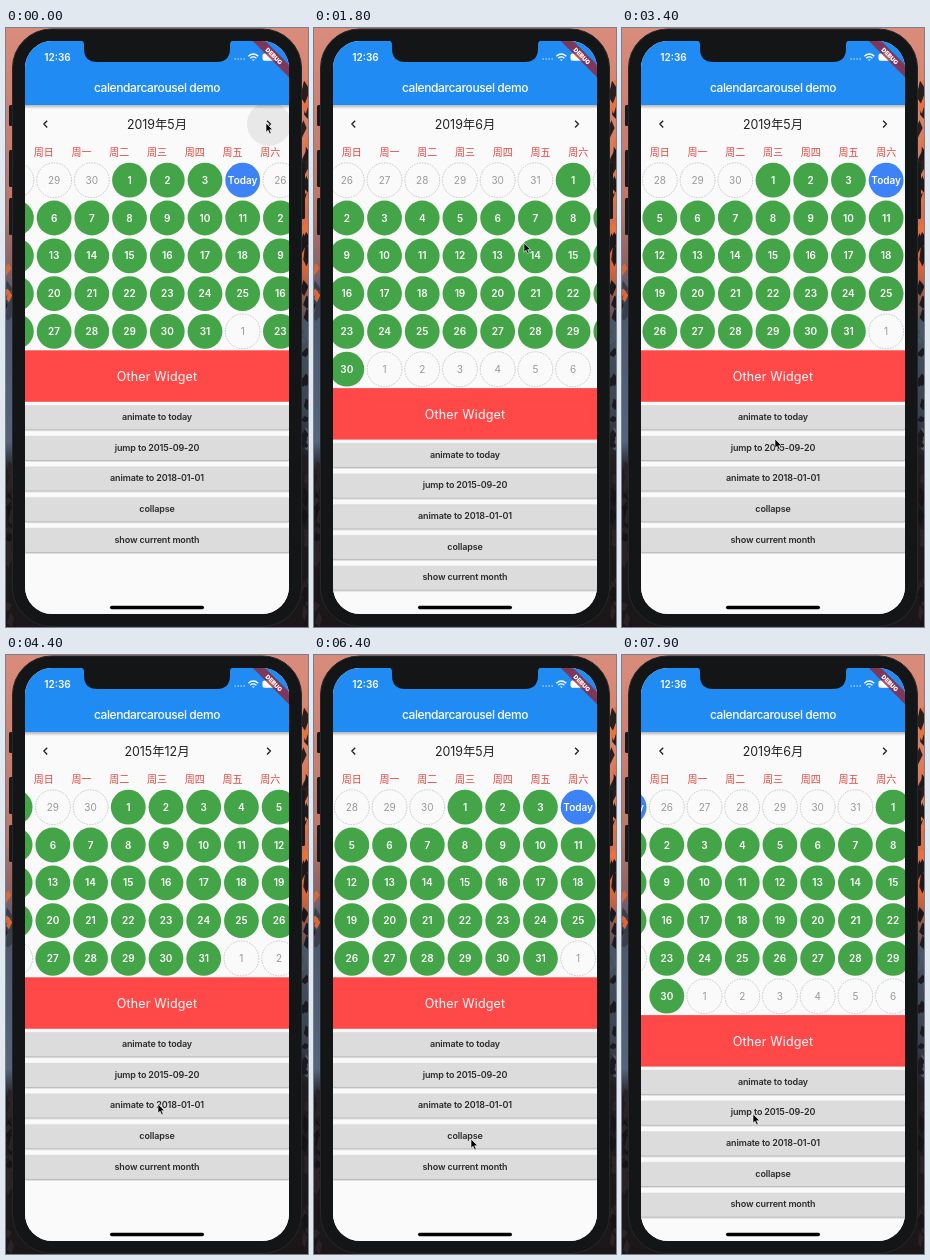
Animation of 302 by 599 pixels, one loop 8 s. Source, as an HTML page:

```html
<!DOCTYPE html>
<html lang="zh">
<head>
<meta charset="utf-8">
<title>Calendar carousel</title>
<style>
  html, body { margin: 0; width: 100%; height: 100%; overflow: hidden; background: #1c1a20; }
  svg { display: block; width: 302px; height: 599px; }
  text { font-family: Inter, "Noto Sans CJK SC", "Noto Sans CJK", "Noto Sans", sans-serif; text-anchor: middle; }
</style>
</head>
<body>
<svg id="stage" viewBox="0 0 302 599" xmlns="http://www.w3.org/2000/svg">
  <defs>
    <linearGradient id="skyL" x1="0" y1="0" x2="0" y2="1">
      <stop offset="0" stop-color="#d98c7c"/>
      <stop offset=".3" stop-color="#b9766a"/>
      <stop offset=".4" stop-color="#8a6266"/>
      <stop offset=".45" stop-color="#4a566c"/>
      <stop offset=".69" stop-color="#56657c"/>
      <stop offset=".74" stop-color="#201c20"/>
      <stop offset="1" stop-color="#1b1718"/>
    </linearGradient>
    <linearGradient id="skyR" x1="0" y1="0" x2="0" y2="1">
      <stop offset="0" stop-color="#d98c7c"/>
      <stop offset=".12" stop-color="#d9846c"/>
      <stop offset=".4" stop-color="#d9653c"/>
      <stop offset=".5" stop-color="#46505f"/>
      <stop offset=".64" stop-color="#3c4453"/>
      <stop offset=".72" stop-color="#201c20"/>
      <stop offset="1" stop-color="#1b1718"/>
    </linearGradient>
    <linearGradient id="barShade" x1="0" y1="0" x2="0" y2="1">
      <stop offset="0" stop-color="#000" stop-opacity=".28"/>
      <stop offset="1" stop-color="#000" stop-opacity="0"/>
    </linearGradient>
    <clipPath id="screen"><rect x="19" y="13" width="264" height="573" rx="27"/></clipPath>
  </defs>

  <rect width="151" height="599" fill="url(#skyL)"/>
  <rect x="151" width="151" height="599" fill="url(#skyR)"/>
  <g id="rocks"></g>

  <g fill="#18191b">
    <rect x="3" y="77" width="5" height="21" rx="1.5"/>
    <rect x="3" y="122" width="5" height="37" rx="1.5"/>
    <rect x="3" y="170" width="5" height="37" rx="1.5"/>
    <rect x="294" y="135" width="5" height="56" rx="1.5"/>
  </g>
  <rect x="6.5" y="1" width="289" height="597.5" rx="39" fill="#131516" stroke="#25282a"/>

  <g clip-path="url(#screen)">
    <rect x="19" y="13" width="264" height="573" fill="#fafafa"/>
    <g id="pages"></g>
    <g id="week"></g>
    <circle id="ripple" cx="263" cy="96" r="22"/>
    <text id="month" x="151" y="100.8" font-size="12.4" fill="#222"></text>
    <path d="M41.2 92.8l-3.3 3.3 3.3 3.3M261.1 92.8l3.3 3.3-3.3 3.3" fill="none" stroke="#222" stroke-width="1.35"/>
    <g id="lower">
      <rect x="19" y="322" width="264" height="310" fill="#fafafa"/>
      <rect x="19" y="322" width="264" height="51.5" fill="#ff4848"/>
      <text x="151" y="352.5" font-size="12.5" letter-spacing=".15" fill="#fff">Other Widget</text>
    </g>
    <rect x="19" y="77" width="264" height="4" fill="url(#barShade)"/>
    <rect x="19" y="13" width="264" height="64" fill="#1f8bf3"/>
    <text x="151" y="63.8" font-size="12" font-weight="500" letter-spacing="-.4" fill="#fff">calendarcarousel demo</text>
    <text x="51.5" y="32.8" font-size="10" font-weight="600" fill="#fff">12:36</text>
    <path d="M228.5 31h11" stroke="#fff" stroke-opacity=".6" stroke-width="1.3" stroke-dasharray="1.4 1.6"/>
    <path d="M242.3 28.2q5-4.4 10 0M244.2 30.2q3.1-2.6 6.2 0" fill="none" stroke="#fff" stroke-width="1.4"/>
    <path d="M245.8 31.4h3l-1.5 1.7z" fill="#fff"/>
    <rect x="256.5" y="25.5" width="13.5" height="7.2" rx="2" fill="#fff"/>
    <rect x="270.7" y="27.6" width="1" height="3" rx=".5" fill="#fff"/>
    <g transform="translate(268 28) rotate(45)">
      <rect x="-40" y="-4.4" width="80" height="8.8" fill="#9c1c28" fill-opacity=".74"/>
      <text y="2.2" font-size="6" font-weight="900" fill="#fff">DEBUG</text>
    </g>
    <rect x="104" y="577.8" width="94" height="3.4" rx="1.7" fill="#000"/>
  </g>
  <path d="M74 12.5q4 0 4 4v4q0 13.5 13.5 13.5h119q13.5 0 13.5-13.5v-4q0-4 4-4z" fill="#131516"/>
  <path id="cursor" d="M0 0v9.2l2.1-1.9 1.5 3.4 1.6-.7-1.5-3.3h2.9z" fill="#000" stroke="#fff" stroke-width=".6"/>
</svg>

<script>
const NS = 'http://www.w3.org/2000/svg';
const LOOP = 8000, PAGE = 264, COL = PAGE / 7, ROW = 37.8;
const LEFT = 19 + COL / 2, TOP = 152.2;
const $ = id => document.getElementById(id);

function add(parent, tag, attrs, text) {
  const el = document.createElementNS(NS, tag);
  for (const k in attrs) el.setAttribute(k, attrs[k]);
  if (text) el.textContent = text;
  parent.appendChild(el);
  return el;
}

// Jagged landscape at both sides of the phone
let seed = 11;
const rnd = () => (seed = seed * 16807 % 2147483647) / 2147483647;
function rocks(x, y0, y1, count, colors) {
  for (let i = 0; i < count; i++) {
    const y = y0 + rnd() * (y1 - y0), h = 5 + rnd() * 18;
    add($('rocks'), 'path', {
      d: `M${x + rnd() * 4} ${y}l${3 + rnd() * 4} ${h * .4}l${-2 - rnd() * 4} ${h * .6}l${-2 - rnd() * 3} ${-h * .3}z`,
      fill: colors[Math.floor(rnd() * colors.length)]
    });
  }
}
rocks(1, 235, 285, 12, ['#1e1a1f', '#d8683c', '#3a3f4d']);
rocks(1, 430, 590, 16, ['#151315', '#2a2224']);
rocks(297, 50, 260, 26, ['#1d1719', '#e8713f', '#2b1d1c']);
rocks(297, 260, 420, 16, ['#1b191f', '#4b5566']);
rocks(297, 430, 590, 14, ['#151315', '#2a2224']);

[...'日一二三四五六'].forEach((d, i) =>
  add($('week'), 'text', { x: LEFT + i * COL, y: 128.4, 'font-size': 10, fill: '#e5443c' }, '周' + d));

['animate to today', 'jump to 2015-09-20', 'animate to 2018-01-01', 'collapse', 'show current month']
  .forEach((label, i) => {
    const y = 377 + i * 30.7;
    const box = (dy, fill, o) => add($('lower'), 'rect',
      { x: 19, y: y + dy, width: PAGE, height: 23.9, rx: 1.2, fill, 'fill-opacity': o });
    box(2, '#000', .1);
    box(1, '#000', .16);
    box(-.6, '#000', .05);
    box(0, '#dcdcdc', 1);
    add($('lower'), 'text', {
      x: 151, y: y + 14.6, 'font-size': 9, 'font-weight': 600, 'letter-spacing': -.14, fill: '#2a2a2a'
    }, label);
  });

// Months are counted from May 2019
const monthDate = n => new Date(2019, 4 + n, 1);
function rowCount(n) {
  const days = new Date(2019, 5 + n, 0).getDate();
  return Math.ceil((monthDate(n).getDay() + days) / 7);
}

function makePage() {
  const g = add($('pages'), 'g', {});
  const cells = [];
  for (let i = 0; i < 42; i++) {
    const x = LEFT + i % 7 * COL, y = TOP + Math.floor(i / 7) * ROW;
    const cell = add(g, 'g', {});
    cells.push({
      cell,
      dot: add(cell, 'circle', { cx: x, cy: y, r: 17.4, 'stroke-width': .7, 'stroke-dasharray': '1.6 1.1' }),
      label: add(cell, 'text', { x, y: y + 3.6, 'font-size': 10 })
    });
  }
  return { g, cells, month: null };
}

function fillPage(page, n) {
  if (page.month === n) return;
  page.month = n;
  const first = monthDate(n), rows = rowCount(n);
  page.cells.forEach(({ cell, dot, label }, i) => {
    const date = new Date(first.getFullYear(), first.getMonth(), 1 - first.getDay() + i);
    const inside = date.getMonth() === first.getMonth();
    const today = n === 0 && inside && date.getDate() === 4;
    cell.setAttribute('display', i < rows * 7 ? 'inline' : 'none');
    dot.setAttribute('fill', today ? '#3e82f7' : inside ? '#43a547' : 'none');
    dot.setAttribute('stroke', inside ? 'none' : '#b5b5b5');
    label.setAttribute('fill', inside ? '#fff' : '#999');
    label.setAttribute('font-weight', inside ? 600 : 400);
    label.textContent = today ? 'Today' : date.getDate();
  });
}

const pages = [makePage(), makePage()];
const smooth = x => x * x * (3 - 2 * x);
const settle = x => 1 - (1 - x) ** 3;

// start, end, from month, to month, easing
const moves = [
  [-79, 321, 0, 1, smooth], [380, 780, 1, 2, smooth], [825, 1225, 2, 3, smooth],
  [1250, 1500, 3, 2, settle], [1508, 1908, 2, 1, settle], [2200, 2600, 1, 0, settle],
  [3600, 3601, -44, -44, smooth], [4300, 4800, -44, -16, smooth],
  [5500, 5501, 0, 0, smooth], [7620, 8020, 0, 1, settle]
];

function position(t) {
  const [a, b, from, to, ease] = moves.filter(m => m[0] <= t).pop();
  return from + (to - from) * ease(Math.min(1, (t - a) / (b - a)));
}

// time, x, y of the pointer tip
const pointer = [
  [0, 260, 95], [880, 260, 96], [1000, 248, 116], [1230, 125, 205], [1370, 205, 210],
  [1480, 130, 212], [1650, 208, 214], [1800, 210, 215], [2080, 130, 218], [2300, 215, 220],
  [2500, 215, 225], [3250, 154, 405], [3400, 153, 411], [3650, 153, 413], [4150, 152, 448],
  [4450, 152, 449], [4950, 150, 509], [5600, 150, 509], [6250, 157, 488], [6400, 157, 484],
  [7250, 200, 230], [7480, 200, 225], [7660, 110, 240], [7900, 131, 459], [8000, 132, 460]
];
const glow = [[0, .07], [750, .07], [1000, .035], [1300, 0], [8000, 0]];

function track(keys, t, ease) {
  const i = Math.max(1, keys.findIndex(k => k[0] >= t));
  const a = keys[i - 1], b = keys[i];
  const f = ease((t - a[0]) / (b[0] - a[0]));
  return a.slice(1).map((v, j) => v + (b[j + 1] - v) * f);
}

function draw(t) {
  const pos = position(t), base = Math.floor(pos), near = Math.round(pos);
  pages.forEach((page, i) => {
    fillPage(page, base + i);
    page.g.setAttribute('transform', `translate(${(base + i - pos) * PAGE} 0)`);
  });
  const d = monthDate(near);
  $('month').textContent = `${d.getFullYear()}年${d.getMonth() + 1}月`;
  $('lower').setAttribute('transform', `translate(0 ${(rowCount(near) - 5) * ROW + .3})`);
  $('ripple').setAttribute('fill-opacity', track(glow, t, x => x)[0]);
  const [x, y] = track(pointer, t, smooth);
  $('cursor').setAttribute('transform', `translate(${x} ${y})`);
}

const start = performance.now();
function tick() {
  draw((performance.now() - start) % LOOP);
  requestAnimationFrame(tick);
}
tick();
</script>
</body>
</html>
```
